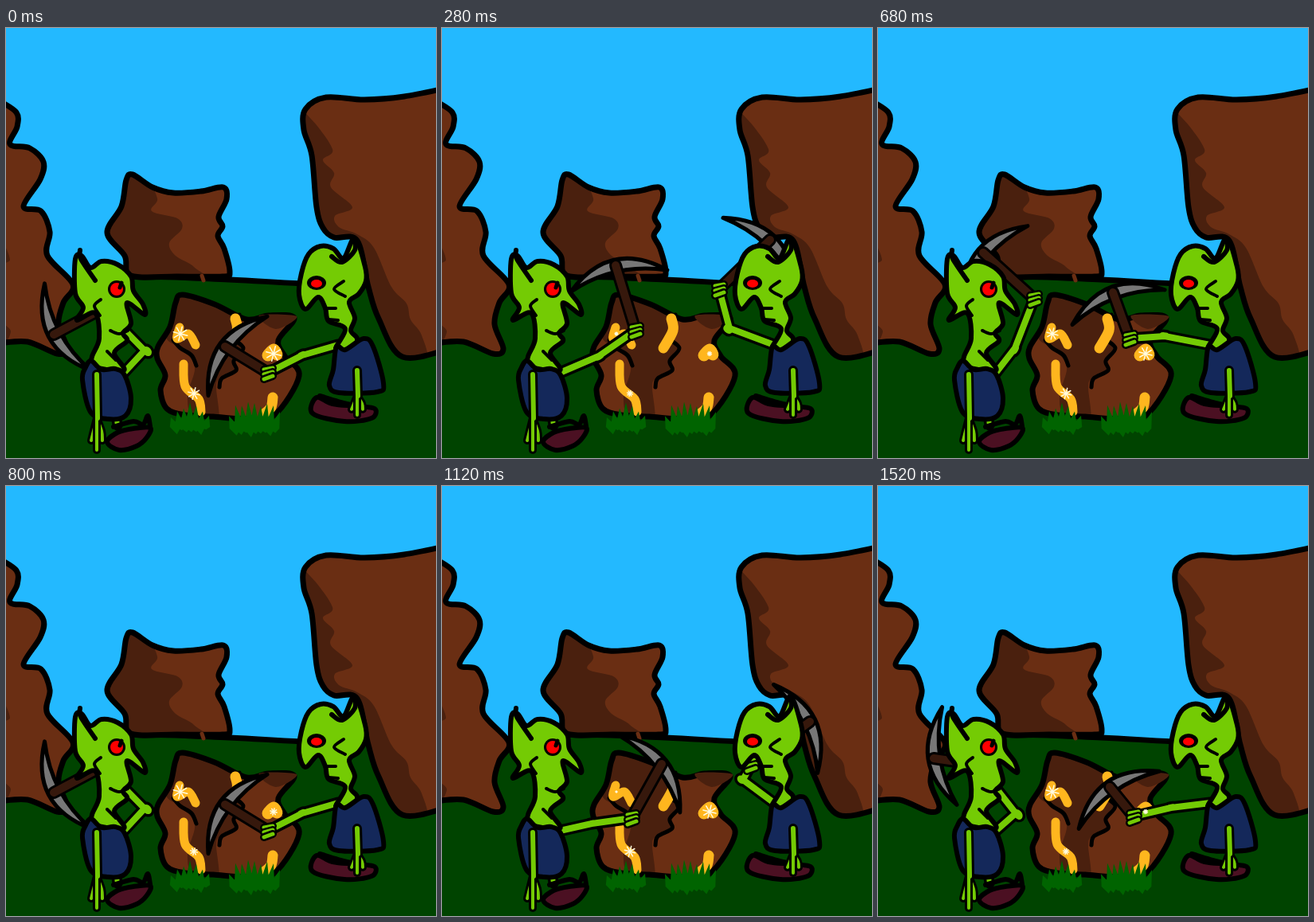
Write an HTML page with a canvas that moves like this. It is 540 px wide and 540 px high and loops after 1.69 s.

```html
<!DOCTYPE html>
<html>
<head>
<meta charset="utf-8">
<style>
html, body { margin: 0; width: 100%; height: 100%; overflow: hidden; background: #23b9ff; }
canvas { display: block; width: 540px; height: 540px; }
</style>
</head>
<body>
<canvas id="stage" width="540" height="540"></canvas>
<script>
const ctx = document.getElementById('stage').getContext('2d');
const SKY = '#23b9ff', GROUND = '#004400', ROCK = '#6a2e13', SHADE = '#4a200e', GOLD = '#ffb61e',
  GRASS = '#006400', SKIN = '#74cb04', SHIRT = '#14285a', SHOE = '#4b1022', STEEL = '#777', WOOD = '#36180c';
const STEP = 40, LOOP = 1690, LAST = 38, HALF_SWING = 10;
ctx.lineJoin = ctx.lineCap = 'round';

// Smooth curve through "x,y x,y ..."; a doubled point makes a corner.
function curve(text, closed) {
  const p = text.split(' ').map(s => s.split(',').map(Number)), n = p.length;
  const at = i => closed ? p[(i + n) % n] : p[Math.max(0, Math.min(n - 1, i))];
  const path = new Path2D();
  path.moveTo(...p[0]);
  for (let i = 0; i < (closed ? n : n - 1); i++) {
    const [a, b, c, d] = [at(i - 1), at(i), at(i + 1), at(i + 2)];
    path.bezierCurveTo(b[0] + (c[0] - a[0]) / 6, b[1] + (c[1] - a[1]) / 6,
      c[0] - (d[0] - b[0]) / 6, c[1] - (d[1] - b[1]) / 6, c[0], c[1]);
  }
  return path;
}
function stroke(path, color, width) {
  ctx.strokeStyle = color;
  ctx.lineWidth = width;
  ctx.stroke(path);
}
function fill(path, color, edge) {
  ctx.fillStyle = color;
  ctx.fill(path);
  if (edge) stroke(path, '#000', edge);
}
const blob = (text, color, edge) => fill(curve(text, true), color, edge);
const line = (text, width = 4, color = '#000') => stroke(curve(text), color, width);
function limb(text, color, width, edge = 7) {
  line(text, width + edge);
  line(text, width, color);
}
function oval(x, y, rx, ry, color) {
  ctx.fillStyle = color;
  ctx.beginPath();
  ctx.ellipse(x, y, rx, ry, 0, 0, 7);
  ctx.fill();
}
function random(seed) {
  return () => (seed = seed * 16807 % 2147483647) / 2147483647;
}
function rock(outline, shade) {
  const path = curve(outline, true);
  fill(path, ROCK);
  ctx.save();
  ctx.clip(path);
  blob(shade, SHADE);
  ctx.restore();
  stroke(path, '#000', 7);
}
function tuft(x, y, width, height, blades) {
  const rnd = random(blades * 91), path = new Path2D();
  for (let i = 0; i < blades; i++) {
    const u = (i + 0.5) / blades * 2 - 1, root = x + u * width * 0.38;
    path.moveTo(root - 7, y - 3);
    path.lineTo(x + u * width / 2, y - height * (1 - 0.5 * u * u) * (0.7 + 0.3 * rnd()));
    path.lineTo(root + 7, y - 3);
    path.lineTo(root + 2, y + 8 * rnd());
  }
  fill(path, GRASS);
}

function scenery() {
  ctx.fillStyle = SKY;
  ctx.fillRect(0, 0, 540, 540);
  blob('-9,330 70,320 155,312 280,316 372,321 560,330 560,560 -9,560', GROUND, 7);
  rock('-9,91 -9,91 13,106 14,124 5,146 30,151 47,168 43,190 22,224 44,230 55,256 52,286 84,322 72,345 66,372 77,403 64,409 27,394 -9,396 -9,396',
    '-9,274 5,291 -9,304 -9,360 6,381 -9,394');
  rock('157,311 149,286 127,257 145,224 151,191 159,184 184,200 210,207 245,205 273,200 277,215 267,237 272,249 266,261 274,277 281,307 272,312 215,312',
    '110,170 172,190 190,214 183,230 215,239 221,252 205,270 213,286 236,300 242,318 110,325');
  line('246,311 248,317', 5, ROCK);
  rock('560,74 560,74 500,86 450,90 402,87 376,102 374,128 384,160 390,225 398,251 412,263 441,267 455,325 468,365 498,413 560,402 560,402',
    '360,104 381,112 410,152 398,166 412,182 408,200 435,225 413,236 418,250 441,259 462,276 484,325 503,346 508,366 522,386 527,420 480,420 385,255');
  rock('202,478 194,455 200,436 190,415 191,400 206,375 213,345 222,335 262,347 302,366 330,361 362,364 342,392 350,412 368,437 337,486 300,491 260,488 225,486',
    '205,325 295,355 285,385 297,402 286,420 290,430 270,440 264,450 266,495 235,490 228,462 237,425 219,402 200,385');
  blob('318,361 365,362 339,378', SHADE);
  line('293,360 291,375 284,388 298,402 286,418 289,430 271,440 268,451', 5);
  line('210,392 219,402 233,411 239,424', 5);

  line('218,376 215,390 229,384 238,398', 11, GOLD);
  line('288,365 290,380 278,402', 13, GOLD);
  line('329,411 336,404 340,410', 15, GOLD);
  line('223,422 225,450 242,466 245,482', 11, GOLD);
  line('335,464 333,476 325,484', 13, GOLD);
  tuft(231, 504, 56, 34, 7);
  tuft(312, 506, 72, 44, 9);
}

function hangingArm(x, y, length, fingers) {
  const wrist = y + length;
  for (const i of [-1, 1, 0]) limb(`${x},${wrist} ${x + i * 6},${wrist + fingers * (0.5 - i * 0.1)} ${x + i * 7},${wrist + fingers * (1 - i * i * 0.3)}`, SKIN, 4, 6);
  limb(`${x},${y} ${x + 1},${wrist}`, SKIN, 6, 6);
  line(`${x},${wrist} ${x},${wrist + fingers * 0.5}`, 4, SKIN);
}

function leftGoblin() {
  limb('138,484 140,499', SKIN, 6);
  blob('127,520 140,508 160,503 181,502 177,514 164,525 142,530', SHOE, 6);
  line('135,501 160,494 172,498 178,487 181,500', 6);
  blob('87,290 95,286 106,301 120,293 140,297 157,312 160,330 172,347 174,360 152,345 157,371 147,383 152,393 136,408 148,430 110,425 108,413 117,390 112,358 89,367 97,351 87,333', SKIN, 6);
  line('93,279 94,290 112,317', 6);
  line('119,341 111,349 118,361');
  line('131,380 142,384 153,380');
  line('127,406 138,417');
  oval(139, 328, 11, 11, '#000');
  oval(139, 328, 8, 8, '#f00');
  line('145,320 143,326', 5);
  blob('107,418 120,429 137,428 149,436 157,465 150,487 128,491 106,482 96,442 100,426', SHIRT, 6);
  hangingArm(114, 435, 55, 40);
}

function rightGoblin() {
  blob('385,484 390,464 410,472 440,475 463,478 459,490 425,494', SHOE, 6);
  line('394,462 428,472 446,474', 6);
  blob('368,335 371,308 380,284 395,274 411,277 424,289 438,264 451,300 452,318 443,334 431,344 438,364 433,380 441,390 436,402 414,404 426,378 405,368 401,352 392,338 376,353', SKIN, 6);
  line('437,264 438,279 422,294 409,287', 6);
  line('424,318 412,328 426,337');
  line('400,352 414,352');
  line('405,366 417,367');
  oval(390, 320, 12, 9, '#000');
  oval(390, 321, 7, 5, '#f00');
  blob('415,400 426,404 449,390 461,400 474,446 466,457 418,458 406,449 411,429', SHIRT, 6);
  hangingArm(441, 430, 32, 24);
}

// Six poses per miner: pick head x, y, tilt; hand x, y; elbow x, y
const miners = [
  { shoulder: '148,433', poses: [
    [60, 385, -2.06, 122, 352, 174, 405],
    [70, 342, -1.72, 125, 350, 173, 411],
    [132, 282, -0.85, 196, 340, 172, 402],
    [218, 298, -0.22, 243, 380, 197, 412],
    [276, 349, 0.9, 238, 417, 188, 424],
    [289, 392, 1.1, 237, 431, 190, 433]] },
  { shoulder: '417,398', poses: [
    [275, 400, -0.93, 329, 433, 372, 411],
    [291, 378, -0.62, 321, 415, 368, 404],
    [295, 332, -0.36, 316, 390, 360, 387],
    [412, 266, 0.75, 348, 328, 361, 377],
    [462, 296, 1.11, 388, 350, 378, 369],
    [503, 385, 2.06, 425, 362, 388, 404]] }
];
const blade = new Path2D('M-62 20 Q0 -34 62 20 Q0 -4 -62 20Z');

function drawArm(shoulder, [x, y, tilt, handX, handY, elbowX, elbowY]) {
  ctx.save();
  ctx.translate(x, y);
  ctx.rotate(tilt);
  fill(blade, STEEL, 5);
  ctx.restore();
  limb(`${x},${y} ${handX},${handY}`, WOOD, 10, 6);
  const elbow = `${elbowX},${elbowY}`;
  limb(`${shoulder} ${elbow} ${elbow} ${handX},${handY}`, SKIN, 8);
  for (const i of [-1, 0, 1]) limb(`${handX - 5},${handY + i * 6 + 2} ${handX + 6},${handY + i * 5 - 1}`, SKIN, 5, 5);
}

function drawStar(x, y, size) {
  for (let i = 0; i < 4; i++) {
    const a = i * Math.PI / 4 + 0.25, dx = Math.cos(a) * size, dy = Math.sin(a) * size;
    line(`${x - dx},${y - dy} ${x + dx},${y + dy}`, 1.5, '#fffbe0');
  }
}

// Each blow throws dust: to the right rock face on odd swings, to the left on even ones.
function drawDust(f) {
  const blow = Math.floor((f - 1) / HALF_SWING), age = (f - 1) % HALF_SWING + 1;
  if (blow < 1 || age > 5) return;
  const [x, y] = blow % 2 ? [291, 448] : [259, 468];
  const reach = blow % 2 ? age * 8 : age * 1.7, rnd = random(77);
  for (let i = 0; i < 9; i++) {
    const a = rnd() * 6.28, d = reach * (0.3 + 0.7 * rnd());
    oval(x + Math.cos(a) * d, y + Math.sin(a) * d * 0.6, 1.4, 1.4, '#ffcf45');
  }
}

const wave = (f, period) => Math.cos(f / period * 2 * Math.PI);
let shown = -1;
function tick(now) {
  const f = Math.min(LAST, Math.floor(now % LOOP / STEP));
  if (f !== shown) {
    shown = f;
    const fromBack = HALF_SWING - Math.abs(HALF_SWING - f % (2 * HALF_SWING));
    const pose = Math.round(2.5 + 0.49 * (fromBack - 5));
    scenery();
    miners.forEach(m => drawArm(m.shoulder, m.poses[pose]));
    leftGoblin();
    rightGoblin();
    drawDust(f);
    drawStar(219, 384, 4.5 + 4.5 * wave(f, 20));
    drawStar(236, 459, 5.5 + 2 * wave(f, 15));
    drawStar(336, 409, 6 + 3.5 * wave(f, 15));
  }
  requestAnimationFrame(tick);
}
tick(performance.now());
</script>
</body>
</html>
```
